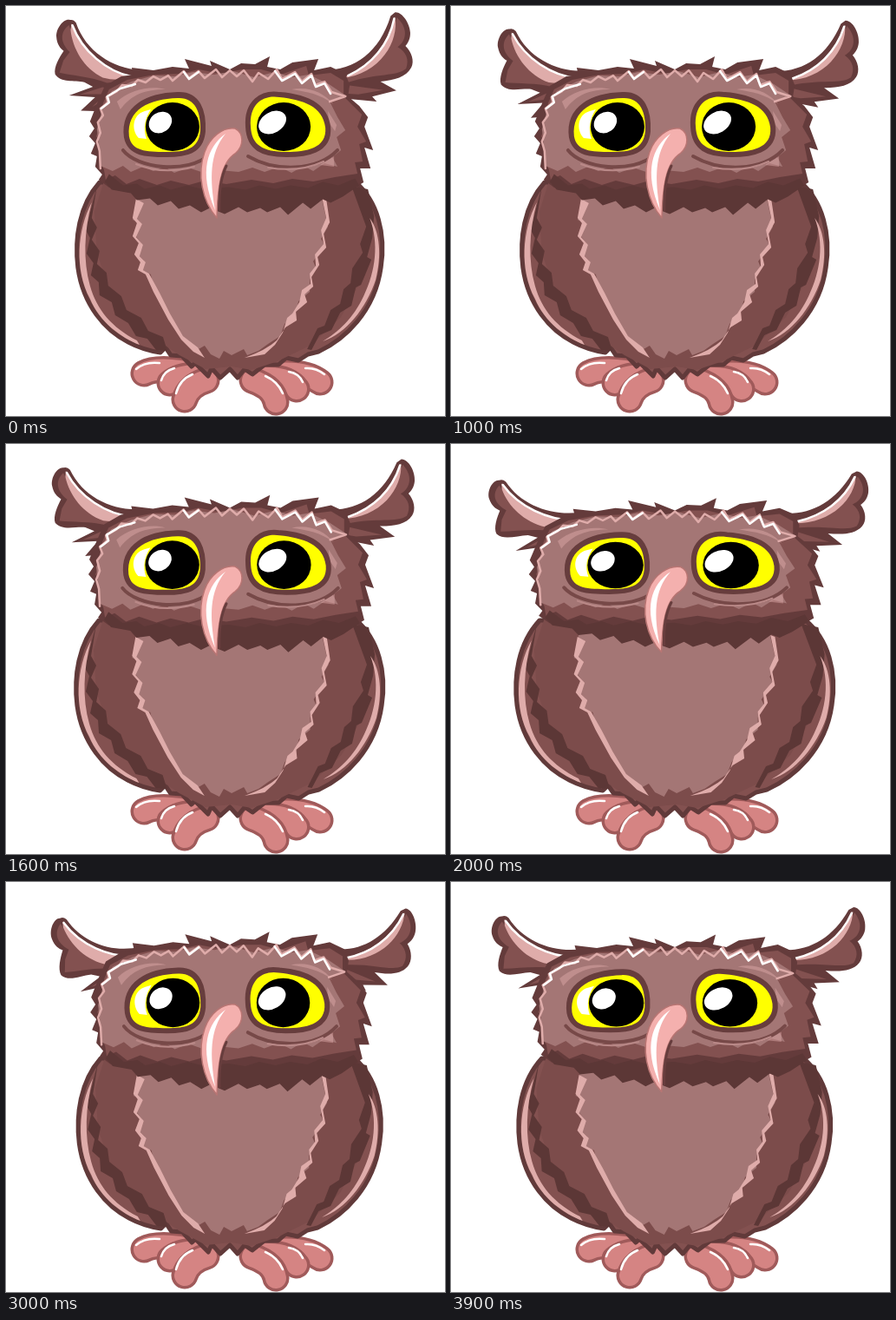
An HTML page that plays this animation: 506 by 472 pixels, repeating every 4000 ms.

```html
<!DOCTYPE html>
<html lang="en">
<head>
<meta charset="utf-8">
<title>Owl</title>
<style>
  html, body { margin: 0; width: 100%; height: 100%; overflow: hidden; background: #fff; }
  svg { display: block; width: 506px; height: 472px; }
  path, ellipse { stroke-linejoin: round; stroke-linecap: round; }
  .line { fill: none; }
  .dark { fill: #643b3b; }
  .fur { fill: #7c4c4b; }
  .lit { fill: #835150; }
  .shade { fill: #5c3736; }
  .face { fill: #a47675; }
  .pink { fill: #dfacaa; }
  .white { fill: #fff; }
  .rim { stroke: #613a3a; stroke-width: 5; }
  .glow { fill: none; stroke: #dfacaa; stroke-width: 2.5; }
  .shine { fill: none; stroke: #fff; stroke-width: 2.5; }
  .toe { fill: none; stroke: #a05a5a; stroke-width: 31; }
  .skin { fill: none; stroke: #d58483; stroke-width: 24; }
</style>
</head>
<body>
<svg viewBox="0 0 506 472" aria-label="Breathing owl">
  <g id="feet">
    <path class="toe" d="M159 423Q172 416 200 420"/><path class="skin" d="M159 423Q172 416 200 420"/>
    <path class="toe" d="M189 434Q200 424 226 425"/><path class="skin" d="M189 434Q200 424 226 425"/>
    <path class="toe" d="M206 453Q211 437 231 431"/><path class="skin" d="M206 453Q211 437 231 431"/>
    <path class="toe" d="M362 433Q345 420 312 423"/><path class="skin" d="M362 433Q345 420 312 423"/>
    <path class="toe" d="M335 441Q325 427 300 428"/><path class="skin" d="M335 441Q325 427 300 428"/>
    <path class="toe" d="M311 456Q308 439 284 431"/><path class="skin" d="M311 456Q308 439 284 431"/>
    <path class="shine" d="M150 418Q160 409 177 411M179 431Q182 420 194 417M196 446Q200 430 215 424M367 424Q357 416 345 417M342 433Q338 423 326 421M319 446Q313 432 299 426"/>
  </g>

  <g id="body">
    <path class="lit rim" d="M108 203C84 230 79 268 83 301C89 345 115 374 141 387Q158 396 178 399L184 393L190 402L203 403L214 415L218 411L233 426L237 417L247 428L258 418L267 428L275 418L284 424L298 413L314 413L323 405L337 408L348 401L360 398C390 384 425 352 432 301C438 262 428 225 403 203Z"/>
    <path class="fur" d="M113 202L399 202L414 240L417 275L408 318L386 358L352 390L313 409L283 419L260 415L230 418L200 402L178 387L142 360L119 324L105 285L102 237Z"/>
    <path class="shade" d="M105 207L99 244L105 255L99 269L108 282L105 297L116 307L118 322L133 334L139 350L156 359L164 374L181 381L186 397L173 396L163 383L150 380L141 365L126 356L122 341L108 333L107 318L98 310L101 296L93 285L97 267L92 258Z"/>
    <path class="shade" d="M398 207L417 211L424 242L422 267L416 289L421 292L409 321L403 324L398 345L385 353L375 373L361 379L352 396L347 395L359 371L367 368L374 350L385 343L389 326L397 319L399 302L411 284L408 274L415 254Z"/>
    <path class="pink" d="M99 226C82 258 79 304 97 337C108 364 133 382 154 390L151 385C122 370 105 350 97 322C89 293 90 260 99 226Z"/>
    <path class="pink" d="M419 244C430 273 426 305 412 334C400 360 382 376 365 386C392 377 415 348 426 315C433 288 431 260 419 244Z"/>
    <path class="face" d="M152 208L150 237L146 246L155 250L149 264L156 273L152 286L159 293L156 303L167 309L171 327L180 340L190 362L205 384L222 395L229 391L236 401L246 406L251 397L260 402L274 395L278 402L291 397L302 389L316 380L321 366L334 353L337 340L350 329L350 315L357 301L354 294L367 275L363 268L371 254L364 222L365 208Z"/>
    <path class="pink" d="M150 222L146 244L151 250L146 265L153 273L148 286L155 295L152 304L161 309L170 329L187 361L202 384L216 398L229 405L221 393L204 380L189 354L177 330L165 308L158 304L161 295L154 288L158 275L150 266L157 251L151 245L159 227Z"/>
    <path class="pink" d="M364 220L369 244L363 258L366 274L356 286L357 299L350 308L351 320L341 327L338 341L330 354L324 359L319 376L310 390L298 401L275 405Q300 396 312 385L322 370L335 362L334 352L347 341L344 332L354 323L352 312L361 298L359 289L369 278L366 262L373 249L369 222Z"/>
  </g>

  <g id="head">
    <g id="earL">
      <path class="dark" d="M72 19C65 17 56 29 57 39C58 48 62 52 66 55C61 63 55 74 57 82C64 92 79 88 91 90L101 95L74 106L104 107L88 123L120 123L158 95L155 74C122 73 91 54 79 22Q76 18 72 19Z"/>
      <path class="lit" d="M71 25C61 33 61 45 73 56L66 66L62 80C77 83 97 83 117 90L133 88C106 75 81 54 71 25Z"/>
      <path class="lit" d="M112 95L87 104L116 103L101 118L133 99Z"/>
      <path class="pink" d="M74 23C86 53 116 78 148 83Q128 88 112 84C90 74 76 52 73 30Z"/>
      <path class="shine" d="M75 25C87 54 116 77 146 82"/>
    </g>
    <g id="earR">
      <path class="dark" d="M450 10C458 9 467 23 467 34C467 41 464 46 461 49C468 56 471 67 467 74C461 85 447 88 431 89L449 100L421 106L426 112L394 108L358 94L363 74C402 76 431 55 445 14Z"/>
      <path class="lit" d="M452 16C464 27 464 42 452 50C462 56 465 65 461 75C450 84 428 79 393 89L387 84C425 75 444 49 452 16Z"/>
      <path class="lit" d="M392 92L434 99L405 103L383 101Z"/>
      <path class="pink" d="M450 15C454 43 432 80 386 84C420 72 440 46 449 17Z"/>
      <path class="shine" d="M449 17C442 47 422 69 394 81"/>
    </g>
    <path class="dark" d="M106 110L114 92L133 81L147 79L145 71L170 74L192 70L211 72L206 61L237 69L235 63L258 73L271 66L287 67L304 58L301 70L316 73L330 65L360 61L355 74L374 70L391 78L396 91L394 104L407 115L417 128L413 139L423 166L413 163L420 187L408 187L412 203L389 217L374 224L365 220L352 231L342 224L325 238L316 229L302 236L294 230L278 235L268 229L252 238L236 231L226 236L212 227L199 232L190 222L175 227L166 219L151 221L144 213L119 209L107 200L111 194L103 185L105 173L98 170L103 158L96 150L102 141L97 133Z"/>
    <path class="lit" d="M112 112L119 96L140 85L171 79L202 78L222 73L248 78L272 73L294 73L316 79L346 69L349 80L374 77L389 86L389 104L410 125L405 139L415 156L407 159L411 179L402 180L405 193L379 197L354 202L330 199L308 204L283 200L254 205L229 201L211 206L190 201L174 206L154 199L139 205L126 195L115 200L113 188L107 178L111 160L104 150L110 137Z"/>
    <path class="shade" transform="translate(0 3.5)" d="M114 199L119 190L135 203L151 201L160 207L177 203L190 208L209 203L225 207L257 205L276 208L292 203L311 207L328 203L348 206L365 199L383 203L402 195L407 203L388 216L374 223L365 219L351 230L342 223L325 237L316 228L301 234L293 229L278 234L268 228L252 236L235 229L225 234L212 226L199 230L190 221L175 226L166 218L151 220L144 212L122 208Z"/>
    <path class="face" d="M112 116L122 98L145 87L171 80L194 81L216 76L240 79L262 75L286 82L310 76L330 82L349 79L372 90L393 104L373 110L382 128L391 143L381 151L386 166L376 174L382 185L367 181L354 190L343 184L329 192L315 185L298 191L284 186L268 191L246 189L225 191L210 186L194 192L183 185L170 190L158 185L144 191L135 184L123 190L109 184L107 158L105 142Z"/>
    <path class="glow" d="M109 187L108 167L105 156L109 146L106 134L112 126L109 118L118 111L116 105L128 98L134 91L145 92L152 85L161 88L170 81L178 85L187 80L192 86L205 75L211 83L222 75L229 83L242 73L249 82L258 74L266 81L274 74L284 87L291 77L302 84L312 73L318 84L333 76L341 87L352 78L356 91L367 87L375 99L391 104L373 110"/>
    <path class="shine" d="M110 118L119 111L117 104L132 95L149 90M205 76L211 84L222 76M310 75L318 86L333 78L341 89L352 80L357 93L367 89L374 101"/>
    <path class="pink" opacity=".45" d="M371 121L381 137L379 144L372 134ZM362 183L378 173L378 185Z"/>

    <g id="open">
      <path class="pink" opacity=".45" d="M128 110C143 96 168 91 184 96C160 96 145 102 132 119ZM329 96C348 92 366 99 377 113C362 101 347 99 329 96Z"/>
      <path class="line" stroke="#774948" stroke-width="4" d="M135 166C151 187 209 194 235 171M279 173C310 191 358 191 382 166"/>
      <path class="line" stroke="#ba8988" stroke-width="2" d="M150 182Q181 195 217 185M302 186Q338 192 366 179"/>
      <g stroke="#673d3d" stroke-width="14" fill="#ff0">
        <path d="M143 150C139 120 165 107 198 106C218 105 224 122 223 144C221 164 207 167 185 167C161 167 146 166 143 150Z"/>
        <path d="M283 139C281 113 297 103 315 106C342 108 364 116 367 140C369 163 346 167 323 167C296 167 284 160 283 139Z"/>
      </g>
      <g fill="#ff0">
        <path d="M142 150C139 119 165 107 198 106C218 105 225 122 224 144C222 165 207 168 185 168C161 168 145 167 142 150Z"/>
        <path d="M282 139C280 112 297 102 315 105C342 108 365 115 368 140C370 164 346 168 323 168C296 168 283 160 282 139Z"/>
      </g>
      <path class="white" d="M160 121C146 125 144 142 153 152L162 153C158 141 160 130 167 119Z"/>
      <ellipse cx="192" cy="139" rx="31" ry="28"/>
      <ellipse cx="320" cy="139" rx="31" ry="28"/>
      <ellipse class="white" cx="178" cy="134" rx="14" ry="11.5" transform="rotate(-35 178 134)"/>
      <ellipse class="white" cx="307" cy="134" rx="17" ry="12" transform="rotate(-30 307 134)"/>
    </g>
    <g id="shut">
      <path class="glow" d="M129 139Q143 128 181 129M326 129Q363 129 378 139"/>
      <path class="lit" stroke="#673d3d" stroke-width="4" d="M136 142C143 129 207 128 225 134Q235 141 226 148C208 155 141 156 136 142ZM280 140C285 128 363 130 373 141C373 154 302 154 285 149Q278 146 280 140Z"/>
      <path class="line" stroke="#774948" stroke-width="3" d="M130 151Q181 163 229 151M279 152Q335 162 377 150"/>
    </g>

    <path d="M243 244C226 225 220 193 229 168C235 151 250 139 264 141C274 146 275 161 264 170C247 181 244 211 243 244Z" fill="#f4b0ae" stroke="#b87573" stroke-width="1.5"/>
    <path class="line" stroke="#673d3d" stroke-width="3" d="M246 235Q245 202 254 184"/>
    <path class="white" d="M253 147C232 162 222 191 241 235C235 200 234 170 253 147Z"/>
  </g>
</svg>
<script>
  const el = id => document.getElementById(id);
  const [body, head, earL, earR, open, shut] =
    ["body", "head", "earL", "earR", "open", "shut"].map(el);

  const wave = (t, peak, period) => Math.cos(2 * Math.PI * (t - peak) / period);
  const scaleAt = (x, y, sx, sy) =>
    `translate(${x} ${y}) scale(${sx} ${sy}) translate(${-x} ${-y})`;

  function draw(t) {
    const puff = wave(t, 0.5, 1.55);
    const wide = 1.013 + 0.027 * puff;
    const ear = -3 + 12 * wave(t, 0.2, 1.1);
    body.setAttribute("transform", scaleAt(257, 400, wide, 1));
    head.setAttribute("transform", scaleAt(255, 150, wide, 0.985 - 0.032 * puff));
    earL.setAttribute("transform", `rotate(${ear} 160 75)`);
    earR.setAttribute("transform", `rotate(${-0.88 * ear} 360 75)`);
    const blink = t > 2.25 && t < 2.45;
    open.style.display = blink ? "none" : "";
    shut.style.display = blink ? "" : "none";
  }

  const start = performance.now();
  function tick() {
    const ms = (performance.now() - start) % 4000;
    draw(Math.floor(ms / 100) / 10);
    requestAnimationFrame(tick);
  }
  tick();
</script>
</body>
</html>
```
